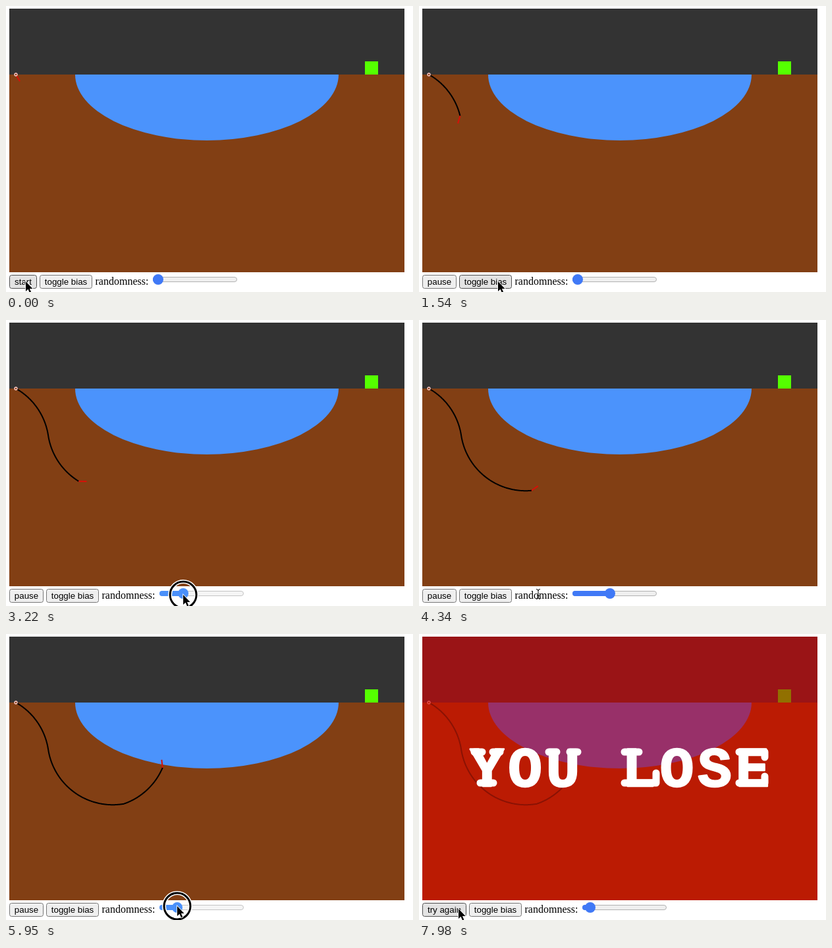
Animation of 618x434 px, one loop 8 s. Source, as an HTML page:

```html
<!DOCTYPE html>
<html lang="en">
<head>
<meta charset="utf-8">
<title>Drilling game</title>
<style>
html, body { margin: 0; width: 100%; height: 100%; overflow: hidden; background: #fff; }
svg { display: block; --sky: #333; --ground: #823f14; --pond: #4b93fc; --goal: #5f0; --pipe: #000; --ring: #fcc; }
svg.lost { --sky: #9a1416; --ground: #bb1b03; --pond: #983069; --goal: #917000; --pipe: #8a1204; --ring: #e8504c; }
svg:not(.lost) #lose, .lost #bit { display: none; }
.btn { font: 13.333px "Liberation Sans", Arial, sans-serif; text-anchor: middle; }
.label { font: 16px "Liberation Serif", "Times New Roman", serif; }
#lose { fill: #fff; stroke: #fff; stroke-linejoin: round; stroke-linecap: round; }
#lose text { font: bold 86px "Liberation Mono", "Courier New", monospace; letter-spacing: 6px; stroke-width: 2.5px; }
#lose path { fill: none; stroke-width: 11px; }
</style>
</head>
<body>
<svg id="stage" width="618" height="434" viewBox="0 0 618 434">
  <rect x="5" y="4" width="600" height="100" fill="var(--sky)"/>
  <rect x="5" y="104" width="600" height="300" fill="var(--ground)"/>
  <path d="M105 104A200 100 0 0 0 505 104Z" fill="var(--pond)"/>
  <rect x="545" y="84" width="20" height="20" fill="var(--goal)"/>
  <path id="pipe" fill="none" stroke="var(--pipe)" stroke-width="2"/>
  <path id="bit" stroke="#d81008" stroke-width="2"/>
  <circle cx="15" cy="104" r="2" fill="var(--ground)" stroke="var(--ring)" stroke-width="1.3"/>

  <g id="lose">
    <text x="77.6" y="231">YOU LOSE</text>
    <!-- slab serifs -->
    <path d="M84 179h12M112 179h11M93 226h20M197 179h12M229 179h12M312 179h22M312 226h48v-15M486 179h39v8M486 226h39v-10"/>
  </g>

  <rect id="mainBox" x="5.5" y="408.5" height="20" rx="3"/>
  <rect id="biasBox" y="408.5" height="20" rx="3"/>
  <text id="mainText" class="btn" y="423"></text>
  <text id="biasText" class="btn" y="423">toggle bias</text>
  <text id="label" class="label" y="423">randomness:</text>
  <g id="slider">
    <rect id="track" x=".5" y="411.5" width="127" height="7" rx="3.5"/>
    <rect id="level" y="411" height="8" rx="4"/>
    <circle id="thumb" cy="415" r="8"/>
  </g>

  <g id="cursor">
    <g id="ring" fill="none">
      <circle r="20" stroke="#fff" stroke-width="6"/>
      <circle r="20" stroke="#000" stroke-width="3"/>
    </g>
    <path id="arrow" d="M0 0V15L3.5 11.8L6 17.5L8.3 16.5L5.9 11H10.5Z" stroke="#fff" paint-order="stroke" stroke-width="1.6"/>
    <path id="beam" fill="none" stroke="#000" d="M-3 -7.5Q0 -7.5 0 -5V5Q0 7.5 -3 7.5M3 -7.5Q0 -7.5 0 -5M0 5Q0 7.5 3 7.5M-2 2.5H2"/>
  </g>
</svg>
<script>
const LOOP = 8000, STEP = 70, START = 110, TOGGLE = 1685, END = 6000;
const SPEED = 0.0565, TURN = 0.0101, TILT = 0.52;

// pointer moves: departure, arrival, x, y
const moves = [
  [0, 1, 30, 418], [350, 1260, 120, 418], [1820, 2590, 241, 417],
  [2660, 3680, 290, 417], [3800, 4300, 181, 416], [4830, 5320, 290, 413],
  [5460, 5950, 260, 413], [6790, 7070, 205, 420], [7560, 7910, 60, 417]
];
const clicks = [[70, 140], [1610, 1680]];
const drags = [[2660, 3730], [5390, 6400]];

const $ = id => document.getElementById(id);
const set = (id, attrs) => {
  for (const k in attrs) $(id).setAttribute(k, attrs[k]);
};
const show = (id, on) => set(id, { visibility: on ? "visible" : "hidden" });

function pointer(t) {
  let x = 30, y = 418;
  for (const [from, to, nx, ny] of moves) {
    const p = Math.min(1, Math.max(0, (t - from) / (to - from)));
    const e = p * p * (3 - 2 * p);
    x += (nx - x) * e;
    y += (ny - y) * e;
  }
  return [x, y];
}

const stateAt = t =>
  t < 140 ? ["start", 0] : t < END ? ["pause", 10] : ["try again", 25];
const sliderLeft = t => 223 + stateAt(t)[1];

// the thumb follows the pointer during a drag and keeps its last place after
function thumbAt(t) {
  const drag = drags.filter(d => t >= d[0]).pop();
  if (!drag) return 8;
  const last = Math.min(t, drag[1]);
  return pointer(last)[0] - sliderLeft(last);
}

// the drill always turns towards its bias; randomness adds one kick
function heading(s) {
  const flip = (TOGGLE - START) * SPEED;
  return TILT + TURN * (flip - Math.abs(s - flip)) - (s > 246 ? 0.16 : 0);
}

function drawPipe(t) {
  const len = Math.max(0, Math.min(t, END) - START) * SPEED;
  let x = 15, y = 104, d = "M15 104";
  for (let s = 0; s < len; s++) {
    const step = Math.min(1, len - s), a = heading(s);
    x += step * Math.cos(a);
    y += step * Math.sin(a);
    d += `L${x} ${y}`;
  }
  const a = heading(len) + (t < TOGGLE ? TILT : -TILT);
  set("pipe", { d });
  set("bit", { d: `M${x} ${y}l${12 * Math.cos(a)} ${12 * Math.sin(a)}` });
}

function drawControls(t) {
  const [x, y] = pointer(t), [name, shift] = stateAt(t);
  const pressed = [...clicks, ...drags].some(([a, b]) => t >= a && t < b);
  const over = (left, w) => x >= left && x <= left + w && y > 406;
  const pick = (hot, normal, hover, down) => !hot ? normal : pressed ? down : hover;

  const button = (id, text, left, width) => {
    const hot = over(left, width);
    set(id, {
      x: left, width,
      fill: pick(hot, "#efefef", "#e3e3e3", "#f5f5f5"),
      stroke: pick(hot, "#767676", "#4f4f4f", "#8d8d8d")
    });
    set(text, { x: left + width / 2 });
  };
  button("mainBox", "mainText", 5.5, 41 + shift);
  button("biasBox", "biasText", 51.5 + shift, 79);
  $("mainText").textContent = name;
  set("label", { x: 135.5 + shift });

  const left = sliderLeft(t), value = thumbAt(t), hot = over(left, 128);
  const blue = pick(hot, "#4079f6", "#2c5fc6", "#4a90fa");
  set("slider", { transform: `translate(${left} 0)` });
  set("track", {
    fill: pick(hot, "#efefef", "#e3e3e3", "#f5f5f5"),
    stroke: pick(hot, "#b2b2b2", "#999", "#c4c4c4")
  });
  set("level", { width: value, fill: blue });
  set("thumb", { cx: value, fill: blue });

  const onText = over(135.5 + shift, 81);
  set("cursor", { transform: `translate(${x} ${y})` });
  show("ring", pressed);
  show("arrow", !onText);
  show("beam", onText);
}

function frame(now) {
  const loop = now % LOOP, t = loop - loop % STEP;
  drawPipe(t);
  drawControls(t);
  $("stage").classList.toggle("lost", t >= END);
  requestAnimationFrame(frame);
}
requestAnimationFrame(frame);
</script>
</body>
</html>
```
